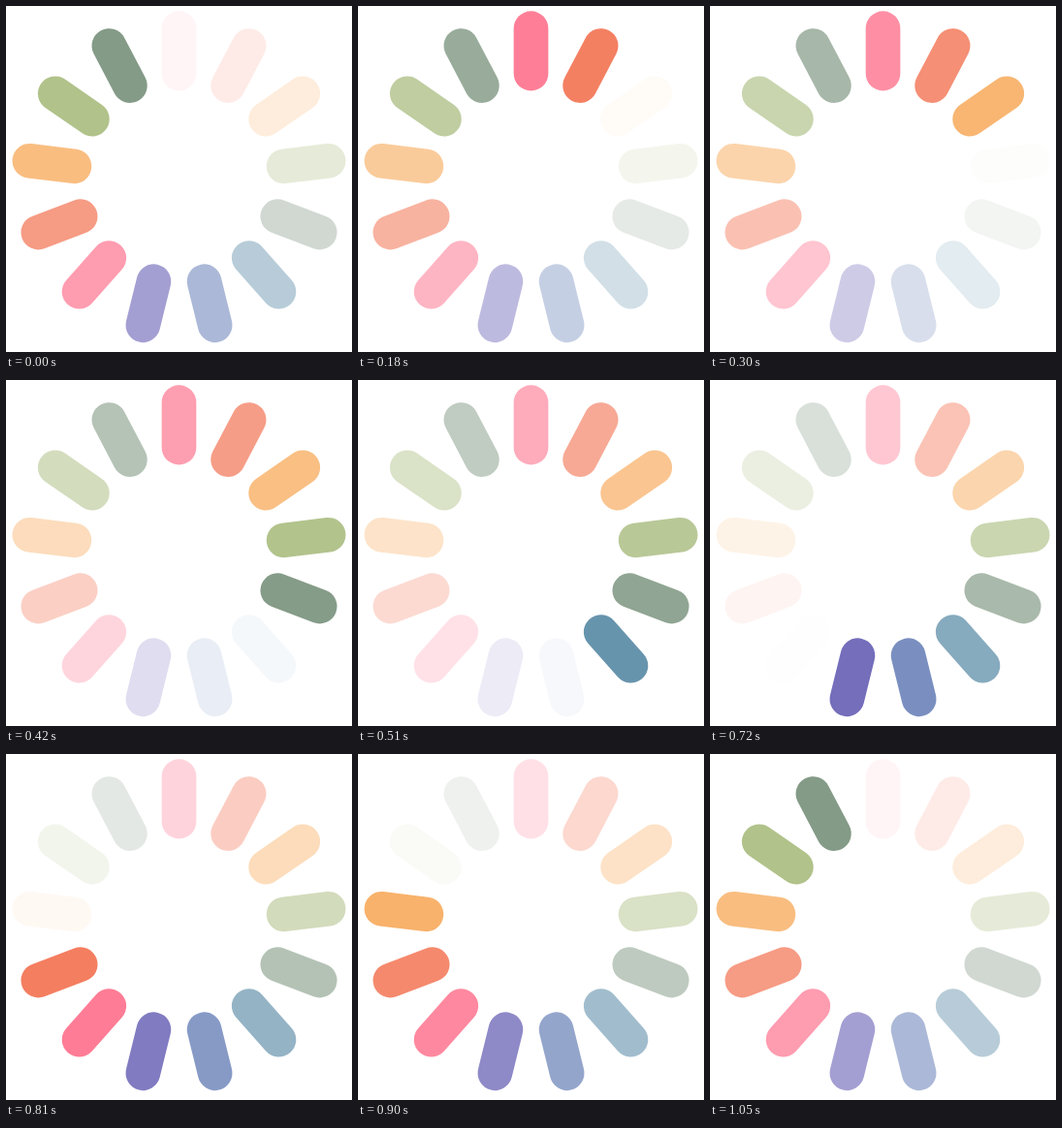
An HTML page for the animation above (1.08 s loop, 357 by 357 pixels).

```html
<!DOCTYPE html>
<html lang="en">
<head>
<meta charset="utf-8">
<title>Loading spinner</title>
<style>
  html, body { margin: 0; width: 100%; height: 100%; overflow: hidden; background: #fff; }
  svg { display: block; width: 100%; height: 100%; }
</style>
</head>
<body>
<svg viewBox="0 0 100 100"></svg>
<script>
const COUNT = 13, STEP = 30, STEPS = 36;
const colors = ['#fe718d', '#f47e60', '#f8b26a', '#abbd81', '#849b87', '#6492ac', '#637cb5', '#6a63b6'];
const svg = document.querySelector('svg');

const bars = Array.from({ length: COUNT }, (_, i) => {
  const bar = document.createElementNS('http://www.w3.org/2000/svg', 'rect');
  const attrs = {
    x: 45, y: 1.5, width: 10, height: 23, rx: 5,
    fill: colors[i % colors.length],
    transform: `rotate(${i * 360 / COUNT} 50 50)`
  };
  for (const name in attrs) bar.setAttribute(name, attrs[name]);
  return svg.appendChild(bar);
});

const start = performance.now();

function draw(now) {
  const step = Math.floor(Math.max(0, now - start) / STEP) % STEPS;
  // The first and last steps of a loop show the same pose.
  const phase = step / (STEPS - 1) % 1;
  bars.forEach((bar, i) => {
    const age = (phase + (COUNT - 1 - i) / COUNT) % 1;
    bar.setAttribute('opacity', 1 - age);
  });
  requestAnimationFrame(draw);
}
draw(start);
</script>
</body>
</html>
```
